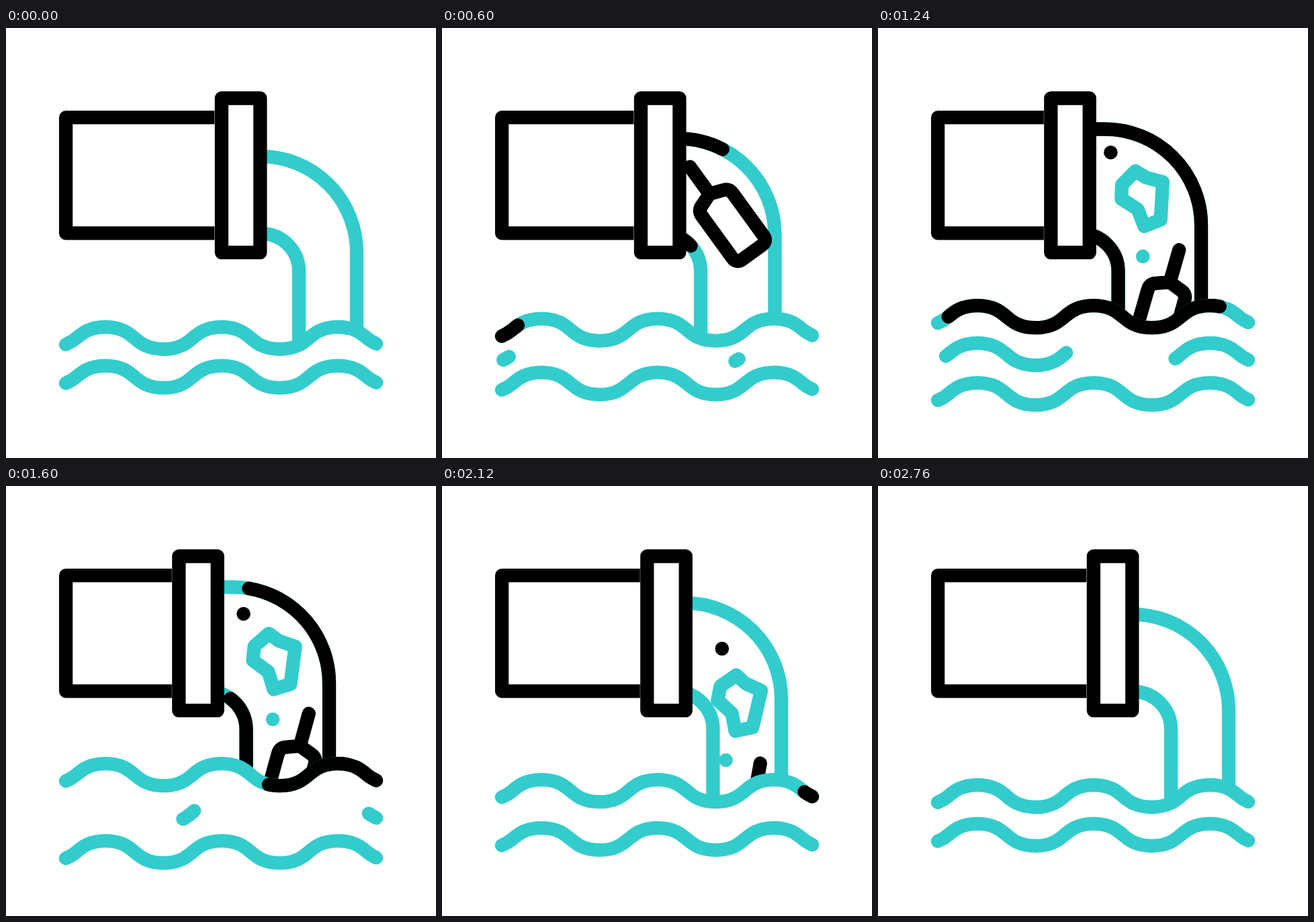
Animation of 640x640 px, one loop 2800 ms. Source, as an HTML page:

```html
<!DOCTYPE html>
<html lang="en">
<head>
<meta charset="utf-8">
<title>Waste water pipe</title>
<style>
html, body { margin: 0; width: 100%; height: 100%; overflow: hidden; background: #fff; }
svg { display: block; width: 100vw; height: 100vh; }
.line { fill: none; stroke-width: 20.3; stroke-linecap: round; stroke-linejoin: round; }
.teal { stroke: #33cccc; }
.black { stroke: #000; }
</style>
</head>
<body>
<svg viewBox="0 0 640 640">
  <defs>
    <clipPath id="above"><path id="surface"/></clipPath>
    <clipPath id="outside"><rect id="mouth" y="0" width="640" height="640"/></clipPath>
  </defs>
  <g clip-path="url(#above)">
    <g clip-path="url(#outside)">
      <g id="outer"></g>
      <g id="inner"></g>
      <path id="bottle" class="line black" d="M0 -49V0M0 1L19 8Q28.5 11 28.5 21V98Q28.5 108.5 18 108.5H-18Q-28.5 108.5 -28.5 98V21Q-28.5 11 -19 8Z"/>
      <path id="stone" class="line teal" d="M-36 -47L-20.5 -36L3.5 -28L-3.5 28L-28.5 36L-36.5 10L-59.5 -7L-57.5 -28Z"/>
      <circle id="drop" r="10.3" fill="#33cccc"/>
      <circle id="grit" r="10.3"/>
    </g>
  </g>
  <g id="top"></g>
  <g id="middle" transform="translate(0 24)"></g>
  <g id="low"></g>
  <path id="pipe" class="line black" style="stroke-linecap:butt"/>
  <rect id="flange" class="line black" style="fill:#fff" x="320.9" y="104.5" width="57.4" height="229.7"/>
</svg>
<script>
const LOOP = 2800, STEP = 40;
const $ = id => document.getElementById(id);
const set = (el, name, value) => el.setAttribute(name, value);
const move = (id, x, y, angle = 0) =>
  set($(id), 'transform', `translate(${x} ${y}) rotate(${angle})`);

function addPath(parent, d, color) {
  const el = document.createElementNS('http://www.w3.org/2000/svg', 'path');
  set(el, 'class', 'line ' + color);
  set(el, 'd', d);
  set(el, 'pathLength', 1);
  return $(parent).appendChild(el);
}

// Ease from 0 to 1 with flat ends; x1 and x2 are the bezier handle positions.
function ramp(t, start, length, x1 = 1 / 3, x2 = 2 / 3) {
  const x = (t - start) / length;
  if (x <= 0) return 0;
  if (x >= 1) return 1;
  let lo = 0, hi = 1;
  for (let i = 0; i < 30; i++) {
    const u = (lo + hi) / 2, v = 1 - u;
    if (3 * u * v * v * x1 + 3 * u * u * v * x2 + u * u * u < x) lo = u; else hi = u;
  }
  return lo * lo * (3 - 2 * lo);
}

function trim(el, from, to) {
  const len = to - from;
  el.style.display = len > 0.002 ? '' : 'none';
  set(el, 'stroke-dasharray', Math.max(len, 0) + ' 3');
  set(el, 'stroke-dashoffset', -from);
}

// Wave with its first crest at (148, 445).
function wavePath() {
  let d = 'M89 471C95 468.5 100 465.5 104.75 461.5';
  for (let i = 0; i < 5; i++) {
    const k = i % 2 ? -1 : 1;
    d += `c8.25 ${-7 * k} 19.25 ${-16.5 * k} 43.25 ${-16.5 * k}`;
    d += `s35 ${9.5 * k} 43.25 ${16.5 * k}`;
  }
  return d + 'C541.5 465 546 467.5 551 470';
}

const wave = wavePath();
const outerPath = 'M359 191h20a143 143 0 0 1 143 143v130';
const innerPath = 'M360 306h20a56 56 0 0 1 56 56v112';

addPath('outer', outerPath, 'teal');
addPath('inner', innerPath, 'teal');
addPath('top', wave, 'teal');
addPath('low', wave, 'teal');
const outerDirt = addPath('outer', outerPath, 'black');
const innerDirt = addPath('inner', innerPath, 'black');
const topDirt = addPath('top', wave, 'black');
const ripple = (x0, x1) => ({
  el: addPath('middle', wave, 'teal'),
  from: (x0 - 89) / 462,
  size: (x1 - x0) / 462
});
const ripples = [ripple(91, 281), ripple(434, 551)];
set($('surface'), 'd', wave + 'V0H89Z');

// Litter leaves the pipe at `from`, floats at `rest`, then drifts by `drift`: x, y, angle.
const litter = [
  { id: 'bottle', delay: 0, from: [250, 200, -88], rest: [434.5, 377, 16], drift: [56, 153, -11] },
  { id: 'stone', delay: 308, from: [200, 240, -49], rest: [422, 259, -.5], drift: [85, 133, 12] },
  { id: 'drop', delay: 240, from: [240, 328, 0], rest: [394, 340, 0], drift: [52, 124, 0] },
  { id: 'grit', delay: 308, from: [192, 193, 0], rest: [346, 184, 0], drift: [129, 106, 0] }
];

function float(item, t) {
  const s = t - item.delay;
  const enter = [ramp(s, 170, 603), ramp(s, 358, 723), ramp(s, 107, 986)];
  const leave = ramp(t, 1124, 1690, .8, .4);
  const [x, y, angle] = item.rest.map((r, i) =>
    item.from[i] + (r - item.from[i]) * enter[i] + item.drift[i] * leave);
  move(item.id, x, y + 260 * ramp(t, 2120, 480), angle);
}

function draw(t) {
  const pull = ramp(t, 80, 1320, .715, .05) - ramp(t, 1480, 1320, .715, .05);
  const flow = ramp(t, 150, 892, .4, .4) - ramp(t, 1702, 892, .4, .4);
  const shift = -64 * pull, rise = -32 * pull, end = 310.4 + shift;

  move('flange', shift, 0);
  set($('mouth'), 'x', 350 + shift);
  set($('pipe'), 'd', `M${end} 133.2H89.1V305.4H${end}`);

  move('top', 0, rise);
  move('surface', 0, rise);
  move('low', 0, 57.7 + 25.6 * pull);
  move('outer', -41 * flow, -40.5 * flow);
  move('inner', -78.5 * flow, 0);

  trim(outerDirt, ramp(t, 1457, 674), ramp(t, 424, 560));
  trim(innerDirt, ramp(t, 1348, 773), ramp(t, 381, 600));
  trim(topDirt, ramp(t, 945, 1560, .7, 0), ramp(t, 460, 965));
  const head = ramp(t, 528, 545), tail = ramp(t, 1162, 545);
  for (const r of ripples) trim(r.el, r.from + r.size * tail, r.from + r.size * head);
  for (const item of litter) float(item, t);
}

const begin = performance.now();
function tick() {
  const t = (performance.now() - begin) % LOOP;
  draw(Math.floor(t / STEP) * STEP);
  requestAnimationFrame(tick);
}
tick();
</script>
</body>
</html>
```
